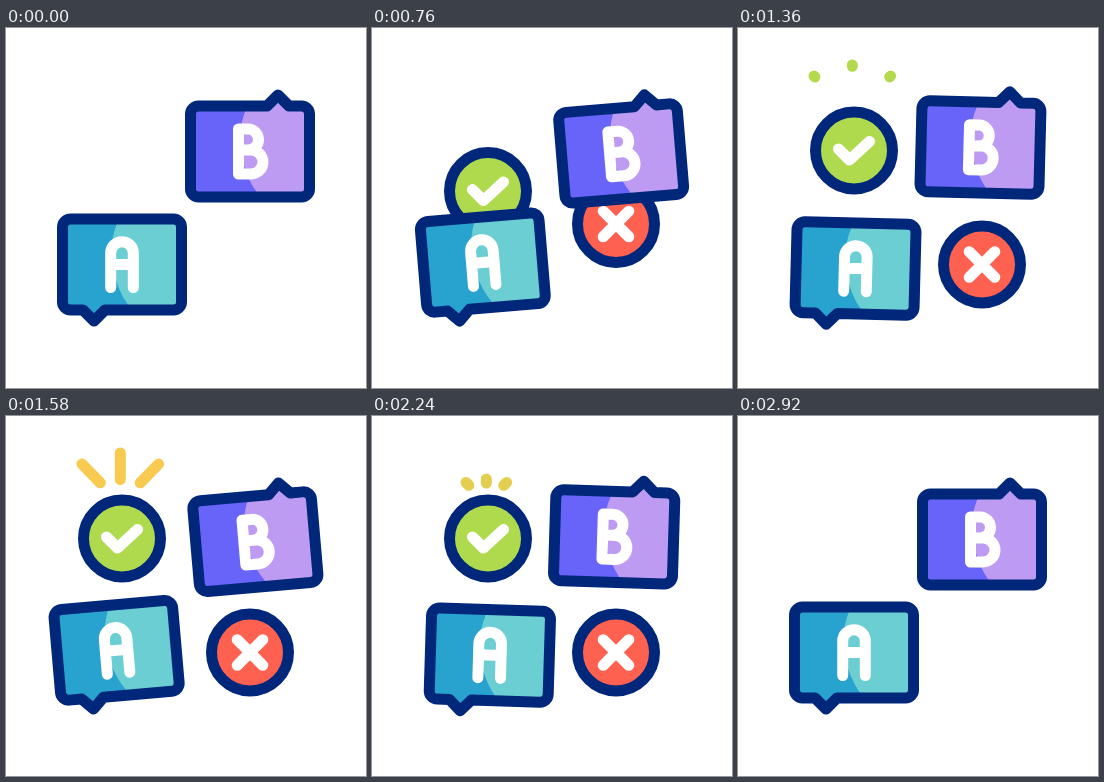
Animation, 360 px wide and 360 px high, one loop 3.6 s. Source, as an HTML page with a canvas:

```html
<!DOCTYPE html>
<html lang="en">
<head>
<meta charset="utf-8">
<title>A or B</title>
<style>
html, body { margin: 0; width: 100%; height: 100%; overflow: hidden; background: #fff; }
canvas { display: block; width: 360px; height: 360px; }
</style>
</head>
<body>
<canvas id="stage"></canvas>
<script>
const LOOP = 3600, BEAT = 400, LINE = 11;
const NAVY = '#00277a', GREEN = [175, 218, 77], YELLOW = [255, 200, 80];
const canvas = document.getElementById('stage');
const ctx = canvas.getContext('2d');
const ratio = window.devicePixelRatio || 1;
canvas.width = canvas.height = 360 * ratio;

const mix = (a, b, u) => a + (b - a) * u;
const rgb = c => `rgb(${c.map(Math.round).join(',')})`;

// eased progress from 0 to 1 between two times
function ease(t, from, to) {
  const u = Math.min(1, Math.max(0, (t - from) / (to - from)));
  return u * u * (3 - 2 * u);
}

// value at t for keys spaced one beat apart
function keyed(t, keys) {
  const i = Math.min(keys.length - 2, Math.floor(t / BEAT));
  return mix(keys[i], keys[i + 1], ease(t, i * BEAT, (i + 1) * BEAT));
}

const TILT = [0, 5, -5, 5, -5, 5, 0];
const SHIFT = [0, 5, 0, 5, 0, 5, 0];

const BOX = new Path2D('M64.5 191 H167.5 a8 8 0 0 1 8 8 V274 a8 8 0 0 1 -8 8 H99 L88 293 L77 282 H64.5 a8 8 0 0 1 -8 -8 V199 a8 8 0 0 1 8 -8 Z');
const SHADE = new Path2D('M50 180 H118 L110.5 197 C101 220 106 254 121.5 276 L132 300 H50 Z');
const LETTER_A = new Path2D('M104.7 259.5 V225 a11.3 11.3 0 0 1 22.6 0 V259.5 M104.7 236.5 H127.3');
const LETTER_B = new Path2D('M232.5 101 H242 a10.5 10.5 0 0 1 0 21 H232.5 M242 122 H245 a12 12 0 0 1 0 24 H232.5 V101');
const CHECK = new Path2D('M-15.5 -1.5 L-4.5 9.5 L15.5 -9');
const CROSS = new Path2D('M-12.8 -12.8 L12.8 12.8 M12.8 -12.8 L-12.8 12.8');

function stroke(path, color) {
  ctx.strokeStyle = color;
  ctx.stroke(path);
}

// flip turns the outline half round the stage, the shading only slides
function bubble(t, o) {
  const dir = o.flip ? -1 : 1;
  ctx.save();
  ctx.translate(o.pivot[0], o.pivot[1] + dir * keyed(t, SHIFT));
  ctx.rotate(keyed(t, TILT) * Math.PI / 180);
  ctx.translate(-o.pivot[0], -o.pivot[1]);

  ctx.save();
  if (o.flip) {
    ctx.translate(360, 360);
    ctx.scale(-1, -1);
  }
  ctx.fillStyle = o.light;
  ctx.fill(BOX);
  ctx.save();
  ctx.clip(BOX);
  if (o.flip) {
    ctx.scale(-1, -1);
    ctx.translate(-360, -360);
    ctx.translate(128.5, -113);
  }
  ctx.fillStyle = o.dark;
  ctx.fill(SHADE);
  ctx.restore();
  stroke(BOX, NAVY);
  ctx.restore();

  stroke(o.letter, '#fff');
  ctx.restore();
}

function badge(x, y, color, sign) {
  ctx.save();
  ctx.translate(x, y);
  ctx.beginPath();
  ctx.arc(0, 0, 38.5, 0, Math.PI * 2);
  ctx.fillStyle = color;
  ctx.fill();
  ctx.strokeStyle = NAVY;
  ctx.stroke();
  stroke(sign, '#fff');
  ctx.restore();
}

// each ray: start x, y and outer end x, y
const RAYS = [
  [114, 87, 76, 48],
  [114.3, 92, 114.3, 37],
  [114.6, 87, 152.6, 48]
];

function rays(t, dy) {
  if (t < 880 || t > 2400) return;
  const tip = ease(t, 880, 1200) - ease(t, 2140, 2350);
  const inner = 0.47 * (1 - ease(t, 2220, 2400));
  const tail = Math.min(tip, mix(tip, inner, ease(t, 1320, 1640)));
  const warm = ease(t, 1320, 1640) - ease(t, 2140, 2400);
  ctx.strokeStyle = rgb(GREEN.map((g, i) => mix(g, YELLOW[i], warm)));
  for (const [x0, y0, x1, y1] of RAYS) {
    ctx.beginPath();
    ctx.moveTo(mix(x0, x1, tail), mix(y0, y1, tail) + dy);
    ctx.lineTo(mix(x0, x1, tip) + 0.01, mix(y0, y1, tip) + dy);
    ctx.stroke();
  }
}

function draw(t) {
  ctx.setTransform(ratio, 0, 0, ratio, 0, 0);
  ctx.fillStyle = '#fff';
  ctx.fillRect(0, 0, 360, 360);
  ctx.lineWidth = LINE;
  ctx.lineCap = ctx.lineJoin = 'round';

  const out = ease(t, 400, 1000) - ease(t, 2400, 3000);
  const away = 116 * (1 - out);
  if (out > 0) {
    rays(t, away);
    badge(116, 122.5 + away, rgb(GREEN), CHECK);
    badge(244, 236.5 - away, '#ff6150', CROSS);
  }
  bubble(t, { pivot: [88, 298], light: '#6bced2', dark: '#28a2ce', letter: LETTER_A });
  bubble(t, { pivot: [272, 62], light: '#bd9bf3', dark: '#6864fa', letter: LETTER_B, flip: true });
}

const start = performance.now();
function tick() {
  draw((performance.now() - start) % LOOP);
  requestAnimationFrame(tick);
}
tick();
</script>
</body>
</html>
```
